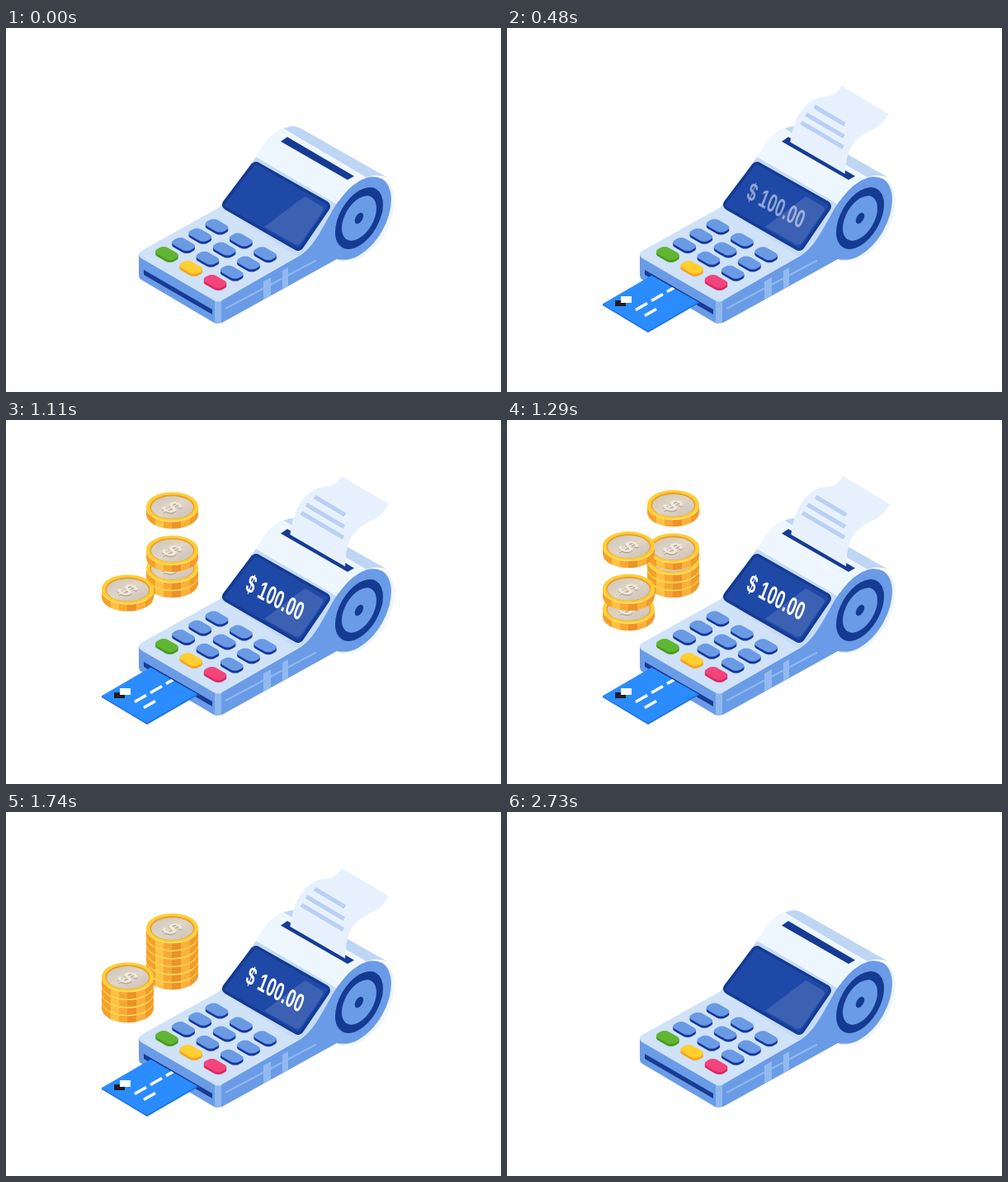
Recreate the animation shown at these times as an HTML page. Size 600 px wide and 441 px high, loop 3000 ms.

```html
<!DOCTYPE html>
<html lang="en">
<head>
<meta charset="utf-8">
<title>Payment terminal</title>
<style>
  html, body { margin: 0; width: 100%; height: 100%; overflow: hidden; background: #fff; }
  svg { display: block; width: 600px; height: 441px; }
  text { font-family: "Liberation Sans", Arial, sans-serif; font-weight: bold; }
</style>
</head>
<body>
<svg viewBox="0 0 600 441">
  <defs>
    <clipPath id="aboveSlot"><path d="M336 134L418 181.5H520V0H336Z"/></clipPath>
    <clipPath id="outsideSlot"><path d="M0 199.500L167 295L250 342.500V441H0Z"/></clipPath>
    <linearGradient id="coinSide">
      <stop offset="0" stop-color="#f6a02a"/><stop offset=".18" stop-color="#f6a02a"/>
      <stop offset=".18" stop-color="#ffc144"/><stop offset=".34" stop-color="#ffc144"/>
      <stop offset=".34" stop-color="#f8a732"/><stop offset=".5" stop-color="#f8a732"/>
      <stop offset=".5" stop-color="#ec9228"/><stop offset=".66" stop-color="#ec9228"/>
      <stop offset=".66" stop-color="#fbb03a"/><stop offset=".84" stop-color="#fbb03a"/>
      <stop offset=".84" stop-color="#f39a2c"/><stop offset="1" stop-color="#f39a2c"/>
    </linearGradient>
    <linearGradient id="coinFace" x2="1" y2="1">
      <stop offset="0" stop-color="#cfc4b8"/><stop offset=".5" stop-color="#dfd5c8"/>
      <stop offset="1" stop-color="#cbbfb1"/>
    </linearGradient>
    <g id="coin">
      <path d="M-31.500 17.300V27A31.500 17.300 0 0 0 31.500 27V17.300Z" fill="url(#coinSide)"/>
      <ellipse cy="19" rx="31.500" ry="17.300" fill="#ffdf5e"/>
      <ellipse cy="17.300" rx="31.500" ry="17.300" fill="#ffcd36"/>
      <ellipse cy="17.800" rx="27" ry="14.800" fill="#e9a02c"/>
      <ellipse cy="18.500" rx="25.500" ry="13.600" fill="url(#coinFace)"/>
      <g font-size="33" text-anchor="middle">
        <text transform="matrix(.75 .4 -.8 .42 -9 24.500)" fill="#b3a696">$</text>
        <text transform="matrix(.75 .4 -.8 .42 -9 23)" fill="#f0e8da">$</text>
      </g>
    </g>
  </defs>

  <!-- Terminal body -->
  <path d="M257 332L352 278C372 268 385 235 403 209L428 230L410 282L401 280L262 357H257Z" fill="#6a9be6"/>
  <path d="M161 274L257 331V358Q254 358 252 357L164 305Q161 303 161 300Z" fill="#6a9be6"/>
  <path d="M253 330H261V357Q257 359 253 357Z" fill="#8fb8ef"/>
  <path d="M259 217L355 276L262 330Q257 333 252 330L164 279Q158 274 164 270Z" fill="#cfe2f7"/>
  <path d="M167 293L250 341V347L167 299Z" fill="#173b94"/>
  <path d="M266 340L376 281.500" stroke="#8fb8ef" stroke-width="2"/>
  <path d="M312 307L321 302V324L312 329ZM335 294L342 290V312L335 316Z" fill="#92baf0"/>

  <!-- Paper roll -->
  <path d="M303 156C314 137 326 121 342 120L440 179C420 186 408 201 400 214Z" fill="#eef7ff"/>
  <path d="M337 122Q348 116 358 122L462 181Q449 176 437 181Z" fill="#bfd5f4"/>
  <circle transform="matrix(.866 -.5 0 1 432 232)" r="45" fill="#eff5fd"/>
  <g transform="matrix(.866 -.5 0 1 428 230.500)">
    <circle r="45" fill="#6a9be6"/>
    <circle r="33.500" fill="#143a92"/>
    <circle r="24.300" fill="#6a9be6"/>
    <circle r="6" fill="#143a92"/>
  </g>
  <path d="M333 137.500L341 132L422 179.500L414 184Z" fill="#173b94"/>

  <!-- Screen -->
  <path d="M259 217L303 156L400 213C385 240 372 268 354 277Z" fill="#c6dbf5"/>
  <g stroke-linejoin="round">
    <path d="M303 169L386 216L354 263L269 214Z" fill="#143a92" stroke="#143a92" stroke-width="14"/>
    <path d="M303 169L386 216L354 263L269 214Z" fill="#1f49a6" stroke="#1f49a6" stroke-width="7"/>
  </g>
  <path d="M362 204L383 216Q386 219 384 222L358 260Q355 264 350 262L313 241Z" fill="#3c61b3"/>
  <g id="keys"></g>

  <!-- Moving parts -->
  <g id="sale">
    <text id="amount" transform="matrix(.555 .31 -.36 .92 289 206)" font-size="31" fill="#fff">$ 100.00</text>
    <g clip-path="url(#aboveSlot)">
      <g id="receipt">
        <path d="M407 68L464 102C455 118 446 120 437 125C420 134 412 146 411 180L344 142C348 110 358 92 377 83C390 79 398 84 407 68Z" fill="#e7f1fe"/>
        <path d="M374 93L411 115M364 102.500L410 129.500M358 112.500L409 142.500" stroke="#b9d0f3" stroke-width="5"/>
      </g>
    </g>
    <g clip-path="url(#outsideSlot)">
      <g id="card">
        <path d="M116 334V336L171 369L259 318V316Z" fill="#1d6fe2"/>
        <path d="M118 333L204 283L259 316L173 366Q171 367.500 169 366L118 335.500Q115 334 118 333Z" fill="#2b8cff"/>
        <path d="M131 330H144V337H131Z" fill="#1d1d22"/>
        <path d="M138 325H151V333H138Z" fill="#fff"/>
        <path d="M156 341.500L170 333.500M175 330.500L189 322.500M194 319.500L208 311.500M213 308.500L227 300.500M167 348.500L181 340.500" stroke="#fff" stroke-width="3.500"/>
      </g>
    </g>
    <g id="coins"></g>
  </g>
</svg>
<script>
const LOOP = 3000;
const SVG_NS = "http://www.w3.org/2000/svg";
const byId = id => document.getElementById(id);
const [sale, amount, receipt, card] = ["sale", "amount", "receipt", "card"].map(byId);

function add(parent, tag, attributes) {
  const node = document.createElementNS(SVG_NS, tag);
  for (const [name, value] of Object.entries(attributes)) node.setAttribute(name, value);
  return parent.appendChild(node);
}

// Keypad: each key is an isometric rounded slab.
const BLUE = ["#6a9ae4", "#17389a"];
const ACTION_KEYS = [["#60b631", "#4c9a22"], ["#ffce30", "#f7a21e"], ["#f3447b", "#d82a63"]];
for (let row = 0; row < 4; row++) {
  for (let column = 0; column < 3; column++) {
    const [top, side] = row === 3 ? ACTION_KEYS[column] : BLUE;
    const x = 255.5 + column * 29.3 - row * 20.2;
    const y = 239.5 + column * 16.9 + row * 11.2;
    for (const [fill, depth] of [[side, 3], [side, 1.5], [top, 0]]) {
      add(byId("keys"), "rect", {
        x: -12, y: -7.5, width: 24, height: 15, rx: 6, fill,
        transform: `matrix(.866 .5 -.866 .5 ${x} ${y + depth})`
      });
    }
  }
}

// Coin stacks, back one first.
const COIN_STEP = 9.6, COIN_DROP = 60, COIN_TIME = 240, COIN_INTERVAL = 150;
const coins = [
  { x: 201.5, base: 171, count: 6, start: 630 },
  { x: 147.5, base: 211, count: 4, start: 970 }
].flatMap(({ x, base, count, start }) => Array.from({ length: count }, (_, i) => ({
  x,
  y: base - i * COIN_STEP,
  start: start + i * COIN_INTERVAL,
  node: add(byId("coins"), "use", { href: "#coin" })
})));

const progress = (t, start, end) => Math.min(1, Math.max(0, (t - start) / (end - start)));
const easeInOut = p => p < .5 ? 2 * p * p : 1 - 2 * (1 - p) ** 2;
const softEase = p => (p + p * p * (3 - 2 * p)) / 2;
const move = (node, x, y) => node.setAttribute("transform", `translate(${x} ${y})`);

function draw(t) {
  sale.setAttribute("opacity", t < 120 ? 0 : 1 - progress(t, 2580, 2730));
  amount.setAttribute("opacity", progress(t, 330, 630));

  const paperLeft = (1 - progress(t, 120, 630)) ** 3;
  move(receipt, -60 * paperLeft, 80 * paperLeft);

  const cardOut = 1 - easeInOut(progress(t, 90, 480)) + progress(t, 2070, 2580) ** 2;
  move(card, -72 * cardOut, 42 * cardOut);
  card.setAttribute("opacity", progress(t, 90, 180));

  for (const { node, x, y, start } of coins) {
    node.setAttribute("visibility", t > start ? "visible" : "hidden");
    move(node, x, y - COIN_DROP * (1 - softEase(progress(t, start, start + COIN_TIME))));
  }
}

const origin = performance.now();
function tick() {
  draw((performance.now() - origin) % LOOP);
  requestAnimationFrame(tick);
}
tick();
</script>
</body>
</html>
```
